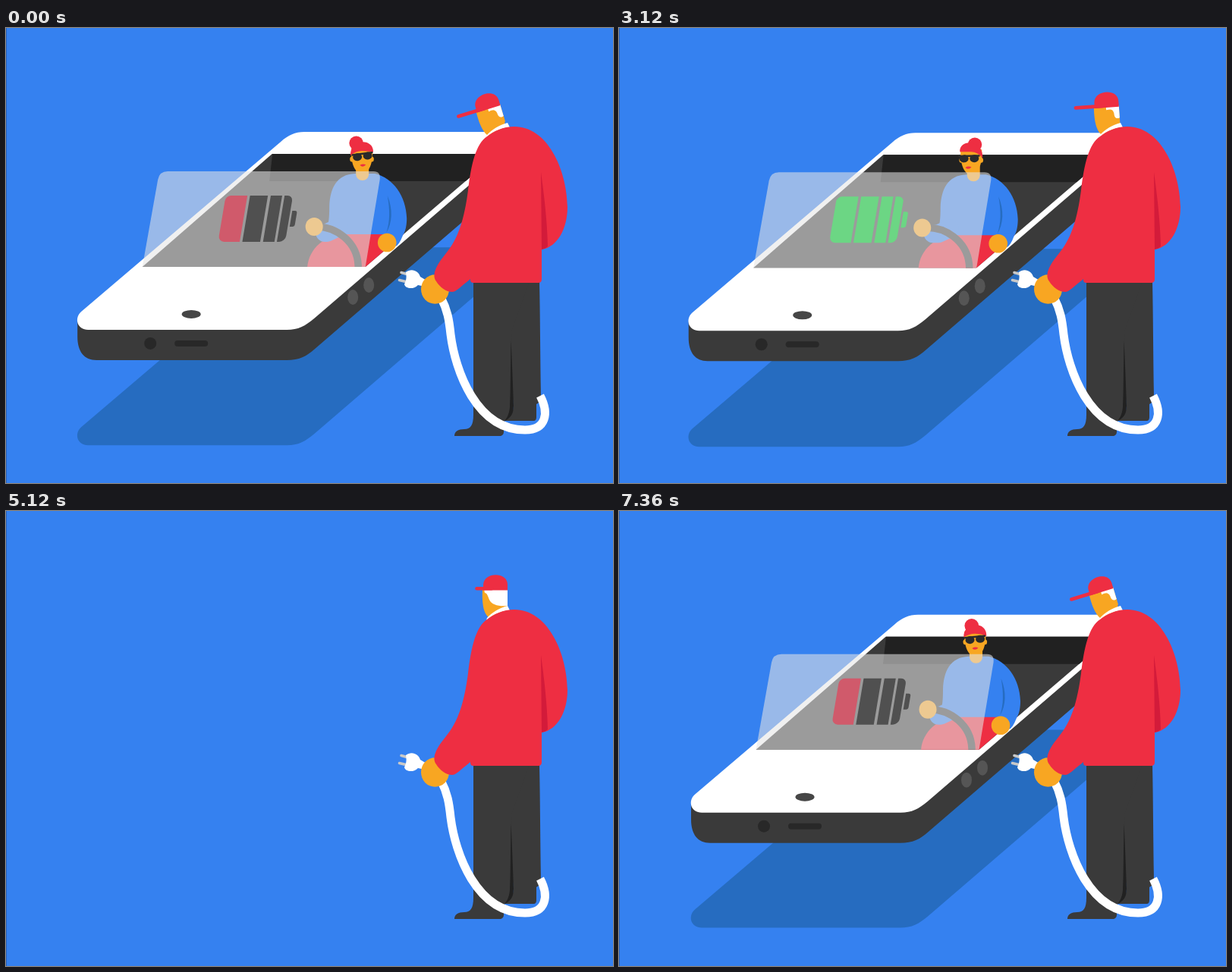
Write an HTML page with a canvas that moves like this. It is 800 px wide and 600 px high and loops after 7400 ms.

```html
<!DOCTYPE html>
<html>
<head>
<meta charset="utf-8">
<style>
html, body { margin: 0; width: 100%; height: 100%; overflow: hidden; background: #3581f0; }
canvas { display: block; }
</style>
</head>
<body>
<canvas width="800" height="600"></canvas>
<script>
const LOOP = 7400;
const c = document.querySelector('canvas').getContext('2d');
const BLUE = '#3581f0', SHADE = '#266cc0', DARK = '#3a3a3a', BLACK = '#212121',
  RED = '#ee2e42', SKIN = '#f8a622', WHITE = '#fff';

const clamp = x => Math.max(0, Math.min(1, x));
const lerp = (a, b, u) => a + (b - a) * u;
const ramp = (t, start, length) => clamp((t - start) / length);
const inOut = x => x < .5 ? 4 * x ** 3 : 1 - 4 * (1 - x) ** 3;

// Smooth interpolation through time, value pairs
function keys(t, ...k) {
  if (t <= k[0]) return k[1];
  for (let i = 2; i < k.length; i += 2) {
    if (t < k[i]) {
      const x = (t - k[i - 2]) / (k[i] - k[i - 2]);
      return lerp(k[i - 1], k[i + 1], x * x * (3 - 2 * x));
    }
  }
  return k[k.length - 1];
}

// Blend two paths with the same commands
function mix(a, b, u) {
  const to = b.match(/[\d.]+/g);
  let i = 0;
  return a.replace(/[\d.]+/g, n => lerp(+n, +to[i++], u));
}

function fill(path, color) {
  c.fillStyle = color;
  c.fill(new Path2D(path));
}
function stroke(path, color, width, cap = 'butt') {
  c.strokeStyle = color;
  c.lineWidth = width;
  c.lineCap = cap;
  c.lineJoin = 'round';
  c.stroke(new Path2D(path));
}
function oval(x, y, rx, ry, color) {
  c.fillStyle = color;
  c.beginPath();
  c.ellipse(x, y, rx, ry, 0, 0, 7);
  c.fill();
}
function box(x, y, w, h, r, color) {
  c.fillStyle = color;
  c.beginPath();
  c.roundRect(x, y, w, h, r);
  c.fill();
}
function group(draw) {
  c.save();
  draw();
  c.restore();
}
const blend = (a, b, u) => `rgb(${a.map((v, i) => Math.round(lerp(v, b[i], u)))})`;

const FACE = 'M106 399C92 399 87 384 97 375L360 151C370 142 379 138 391 138H654C669 138 672 153 662 162L404 384C392 394 383 399 368 399Z';
const SIDE = 'M92 387V408C92 428 101 439 117 439H368C384 439 394 434 405 424L656 208C664 201 667.5 196 667.5 186V150Z';
const SCREEN = 'M348.5 167H645.5L471.5 316H177.5Z';
const GLASS = 'M177.5 316L198 201Q200 190 211 190H482Q492 190 490.5 201L471.5 316Z';

const TORSO = [
  'M634 143C619 153 613 180 609 214C604 252 596 278 580 297C566 314 561 326 567 334C572 342 580 348 588 348C593 348 598 342 612 331C612 335 613 336 617 336L701 336C704 336 706 335 706 331L706 292C727 289 740 264 740 236C739 185 713 130 670 130C655 130 643 136 634 143Z',
  'M600 145C578 157 571 172 559 204C545 238 528 262 512 284C498 302 492 314 500 325C506 334 514 339 521 337C527 336 532 329 573 285C573 335 574 339 578 339L670 339C673 339 675 338 675 334L672 295C694 291 707 264 706 236C704 185 678 135 634 134C618 134 609 139 600 145Z'];
const FOLD = [
  'M705 190L706 292C710 291 712 290 714 288C713 250 709 220 705 190Z',
  'M671 195L673 295C677 294 680 293 682 291C681 260 677 222 671 195Z'];
const FRONT_LEG = [
  'M616 334C616 400 616 450 616 510C616 524 612 529 604 529C596 529 591 532 591 538L650 538C654 538 656 536 656 532L657 518C666 512 669 505 668 494C667 470 666 440 666 400L690 334Z',
  'M577 336C562 380 552 425 558 505C558 517 556 520 550 520C542 520 537 523 537 529L597 529C601 529 603 526 603 522L602 505C608 501 610 495 609 488C603 462 600 410 626 350L640 336Z'];
const BACK_LEG = [
  'M640 334L665 400C666 440 667 480 669 500C667 510 662 516 656 518L695 518C698 518 699 516 699 513L699 496C703 494 705 491 705 486C704 430 704 380 703 334Z',
  'M610 336L626 350C628 400 638 450 658 495C664 516 634 506 634 518L695 518C698 518 699 516 699 513L696 494C699 492 702 488 700 482C680 430 672 390 671 336Z'];
const CABLE = [
  'M573 355C582 372 584 385 586 404C592 452 620 530 684 530C712 530 716 508 704 485',
  'M507 346C528 364 539 388 542 415C548 462 592 530 647 530C676 530 697 512 696 487'];
const PLUG = [
  'M527 322C535 316 544 321 546 328L556 334L552 341L543 339C536 346 526 343 525 338C528 332 528 328 527 322Z',
  'M472 330C476 326 482 328 485 331L490 335L486 348L482 351C476 354 472 352 471 346C469 341 470 335 472 330Z'];
const PRONGS = [
  'M521 322.5L530 325M518.5 332.5L527 334.5',
  'M478 336L482 337M477 344L481 345'];
const HAIR = [
  'M644 103L661 103L661 119C657 121 654 119 654 113C653 107 649 107 644 108Z',
  'M630 103L661 103L661 125C650 126 640 124 637 117C635 112 634 108 631 108Z'];

// Offset of the phone and the height above its shadow
function drive(t) {
  if (t > 2861 && t < 5300) {
    const x = -(((t - 2861) * .002831) ** 4);
    return { x, y: -.886 * x, lift: 153 + .1 * x };
  }
  const at = t < 2861 ? t + LOOP : t;
  const x = (Math.max(0, 7753 - at) * .003675) ** 3 + 130 * clamp((6000 - at) / 480) ** 2;
  const drop = 68.1 * (1 - Math.exp(-((x / 65.6) ** 1.3)));
  return { x, y: -.845 * x + drop, lift: 153 - drop };
}

function driverHead(g) {
  const x = 466 + 3 * g, left = 167 + 8 * g, right = 167 - 8 * g;
  fill('M459 182V193C459 205 476 205 476 193V182Z', SKIN);
  oval(463 - 12.5 * g, 152.5 + 4 * g * g, 9.3, 9.3, RED);
  oval(x - 13, 174, 2.8, 3.5, SKIN);
  oval(x + 13, 174, 2.8, 3.5, SKIN);
  fill(`M${x - 14} 160C${x - 15} 180 ${x - 9} 193 ${x + g} 193C${x + 9} 193 ${x + 15} 180 ${x + 14} 160Z`, SKIN);
  fill(`M${x - 15} ${left}C${x - 16} 146 ${x + 16} 146 ${x + 15} ${right}Q${x + 8} 163 ${x} 163Q${x - 8} 163 ${x - 15} ${left}Z`, RED);
  group(() => {
    c.translate(465.5 + 7.5 * g, 170.5 - 2 * g);
    c.rotate((-5 - 8 * g) * Math.PI / 180);
    stroke('M-13 -3H13', '#2a2a2a', 2.5, 'round');
    oval(-6.8, .5, 6, 5, '#2a2a2a');
    oval(6.8, .5, 6, 5, '#2a2a2a');
  });
  const lip = 465.5 + 9.5 * g, y = 182.5 - 2.3 * g;
  fill(`M${lip - 4} ${y}Q${lip} ${y - 2.5} ${lip + 4} ${y - .5}Q${lip} ${y + 4} ${lip - 4} ${y}Z`, RED);
}

function driver(t) {
  const hand = keys(t, 0, 404, 300, 400, 3300, 400, 4000, 430, 5500, 430, 7400, 404);
  const gaze = keys(t, -370, -1, 227, .9, 2500, .9, 2900, -.5, 3250, -.5, 3700, 1, 4700, 1, 5200, -1, 7030, -1, 7627, .9);
  const angle = -Math.acos((hand - 406) / 55);
  const handY = 316 + 53 * Math.sin(angle);

  fill('M458 193C433 194 425 213 424 236C424 252 423 260 420 268L436 280H512C521 279 526 268 526 252C525 222 508 199 484 193Z', BLUE);
  fill('M395 316C397 292 418 273 446 273H521.7L471.5 316Z', RED);
  fill('M500 270H522C520 278 517 284 513 288L500 294Z', BLUE);
  fill('M500.5 222C508 240 507 258 499 271C504 257 504 241 500.5 222Z', SHADE);
  stroke(`M${hand + 14} 271L421 271L436 264`, BLUE, 24, 'round');
  c.beginPath();
  c.ellipse(406, 316, 56, 53, 0, angle, 0);
  c.strokeStyle = DARK;
  c.lineWidth = 9.5;
  c.lineCap = 'butt';
  c.stroke();
  oval(hand, handY, 11.5, 12, SKIN);
  oval(500, 284, 12.3, 12.3, SKIN);
  driverHead(gaze);
}

function battery(t) {
  const grey = [80, 80, 80], red = [208, 90, 107], green = [108, 214, 132];
  const low = t > 5300 ? ramp(t, 6700, 220) : 1;
  const cells = [
    [287.5, 28.5, 222, 61, [7, 0, 0, 8]],
    [319.5, 23.5, 222, 61, 0],
    [346.8, 15, 222, 61, 0],
    [365, 11, 222, 61, [0, 7, 8, 0]],
    [378.5, 6.5, 242, 21, [0, 3, 3, 0]]];
  group(() => {
    c.globalAlpha = t > 5300 ? 1 : 1 - ramp(t, 3250, 450);
    c.transform(1, 0, -.168, 1, .168 * 222, 0);
    cells.forEach(([x, w, y, h, r], i) => {
      const empty = i ? grey : grey.map((v, n) => lerp(v, red[n], low));
      const charge = t > 5300 ? 0 : ramp(t, 980 + i * 340, 320);
      box(x, y, w, h, r, blend(empty, green, charge));
    });
  });
}

function phone(t) {
  const p = drive(t);
  c.translate(p.x, p.y);
  group(() => {
    c.translate(0, p.lift);
    fill(FACE, SHADE);
  });
  fill(SIDE, DARK);
  fill(FACE, WHITE);
  fill(SCREEN, DARK);
  fill('M349 167H645.5L603.5 203H345Z', BLACK);
  oval(242, 378.5, 12.5, 5.5, '#464646');
  oval(188, 417, 8, 8, '#282828');
  box(220, 413, 44, 8, 4, '#282828');
  oval(455, 356, 7, 10, '#555');
  oval(476, 340, 7, 10, '#555');
  driver(t);
  fill(GLASS, 'rgba(228,228,228,.57)');
  battery(t);
}

function manHead(t, u) {
  const turn = keys(t, 100, 0, 900, .6, 2200, .6, 3000, 0, 4400, 0, 5100, 1, 5560, 1, 6400, .8, 7200, 0);
  const tilt = keys(t, 100, -17, 900, -6, 2200, -6, 3000, -4, 4400, -4, 5100, 0, 5560, 0, 6300, -4, 6500, -4, 7250, -17);
  c.translate(-37 * u, 4.5 * u);
  group(() => {
    c.translate(648, 135);
    c.rotate(tilt * Math.PI / 180);
    c.translate(-648, -135);
    fill('M628 103C627 125 630 136 637 141L655 138L661 126V103Z', SKIN);
    fill(mix(...HAIR, turn), WHITE);
    fill('M629 104.5V97C630 80 661 80 661 97V104.5Z', RED);
    stroke(`M${lerp(604, 620.5, turn)} 102.2H640`, RED, 4.6, 'round');
  });
  fill('M633 144C642 136 652 132 664 131L661 125C650 128 640 134 634 141Z', WHITE);
}

function man(t) {
  const u = inOut(ramp(t, 100, 800)) - inOut(ramp(t, 2200, 800));
  fill(mix(...BACK_LEG, u), DARK);
  fill(mix(...FRONT_LEG, u), DARK);
  group(() => {
    c.globalAlpha = clamp(1 - 3 * u);
    fill('M665.5 412C665 450 665 485 664 500C663 510 660 515 656 519C666 514 669 508 669 498C668 470 667 440 665.5 412Z', BLACK);
  });
  stroke(mix(...CABLE, u), WHITE, 11);
  stroke(mix(...PRONGS, u), '#c8c8c8', 3.6, 'round');
  fill(mix(...PLUG, u), WHITE);
  oval(lerp(565.5, 498, u), lerp(344.5, 336.5, u), 18.5, 19.3, SKIN);
  group(() => manHead(t, u));
  fill(mix(...TORSO, u), RED);
  fill(mix(...FOLD, u), '#d31b3a');
}

function frame(now) {
  const t = now % LOOP;
  c.fillStyle = BLUE;
  c.fillRect(0, 0, 800, 600);
  group(() => phone(t));
  man(t);
  c.fillStyle = '#2b62b8';
  c.fillRect(0, 0, 1, 600);
}

let start;
function tick(now) {
  start ??= now;
  frame(now - start);
  requestAnimationFrame(tick);
}
requestAnimationFrame(tick);
</script>
</body>
</html>
```
